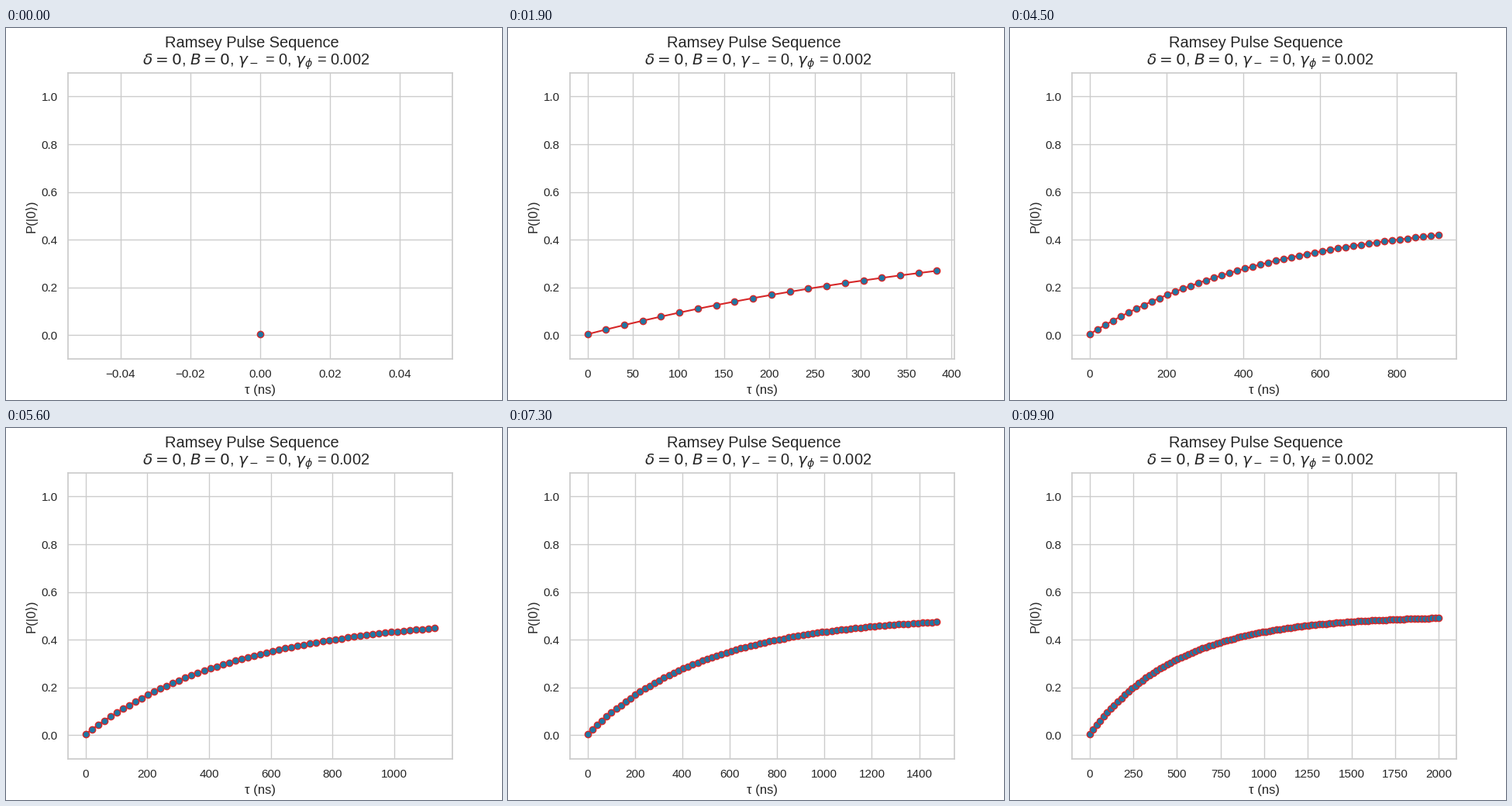
A matplotlib script for the animation above (10000 ms loop, 640 by 480 pixels).

```python
import numpy as np
import matplotlib.pyplot as plt
from matplotlib.animation import FuncAnimation

INK, GRID = "0.15", "0.8"
FRAMES, INTERVAL = 100, 100

plt.rcParams.update({
    "font.family": ["Liberation Sans", "DejaVu Sans"],
    "font.size": 12,
    "axes.labelsize": 12,
    "xtick.labelsize": 11, "ytick.labelsize": 11,
    "text.color": INK, "axes.labelcolor": INK,
    "xtick.color": INK, "ytick.color": INK,
    "axes.edgecolor": GRID, "axes.linewidth": 1.25,
    "axes.grid": True, "axes.axisbelow": True,
    "grid.color": GRID, "grid.linewidth": 1, "grid.linestyle": "-",
    "xtick.bottom": False, "ytick.left": False,
    "xtick.major.size": 6, "ytick.major.size": 6,
    "lines.solid_capstyle": "round",
})

# Dephasing pulls the population towards one half
gamma_phi = 0.002
tau = np.linspace(0, 2000, FRAMES)
prob = 0.5 - 0.496 * np.exp(-gamma_phi * tau)

fig, ax = plt.subplots(figsize=(6.4, 4.8), dpi=100)
fig.suptitle("Ramsey Pulse Sequence \n"
             r" $\delta = 0$, $B = 0$, $\gamma_-$ = 0, $\gamma_\phi$ = 0.002")
ax.set(xlabel="τ (ns)", ylabel="P(|0⟩)", ylim=(-0.1, 1.1))
line, = ax.plot([], [], "-o", color="tab:red", lw=1.5, ms=6,
                markerfacecolor="#1f77a4")


def update(i):
    line.set_data(tau[:i + 1], prob[:i + 1])
    ax.relim()
    ax.autoscale_view(scaley=False)
    return line,


anim = FuncAnimation(fig, update, frames=FRAMES, interval=INTERVAL,
                     repeat=True, repeat_delay=0)
plt.show()
```
